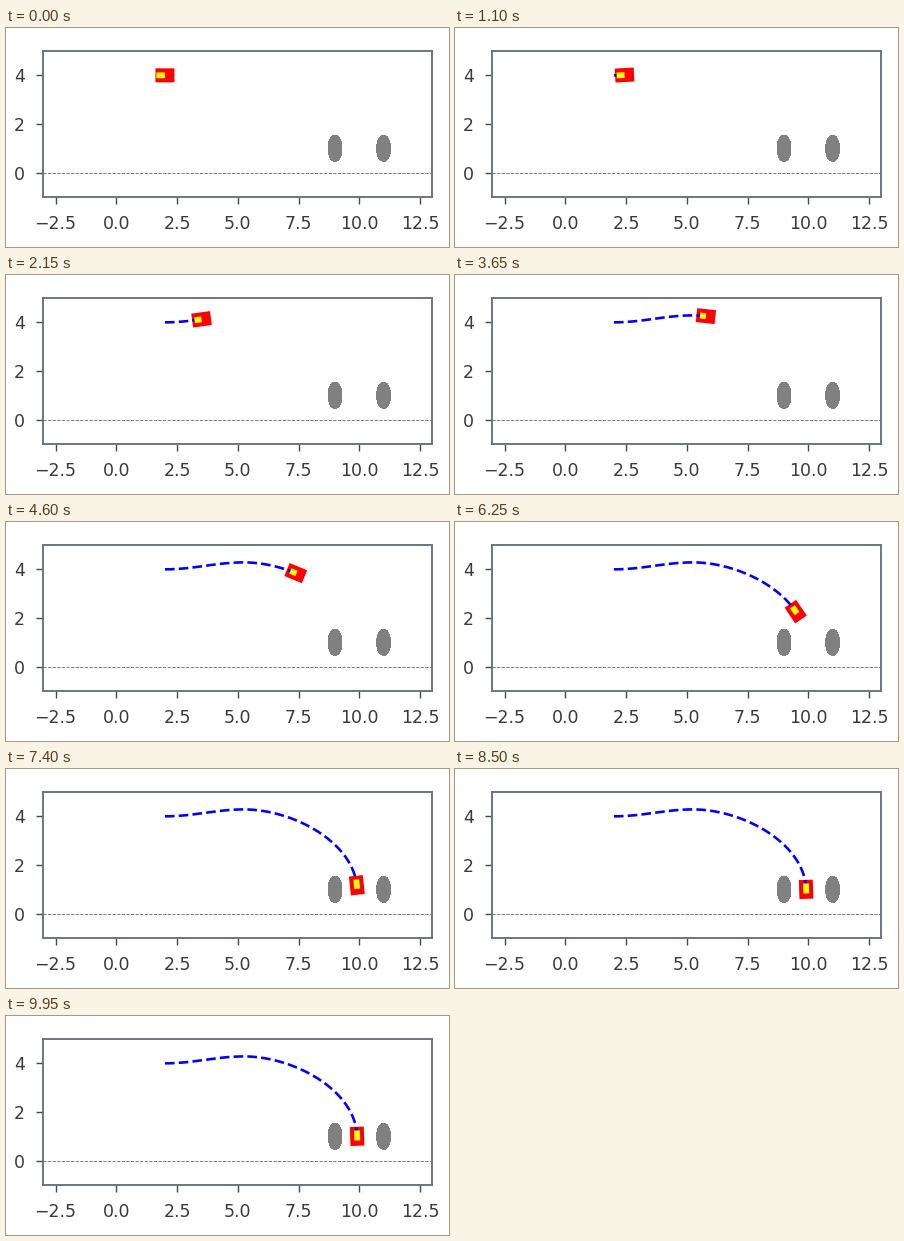
Animation, 443 px wide and 219 px high, one loop 10000 ms. Source, as a matplotlib script:

```python
import numpy as np
import matplotlib.pyplot as plt
from matplotlib.animation import FuncAnimation
from matplotlib.patches import Ellipse, Polygon

W, H, DPI = 443, 219, 125
FRAMES, STEP = 200, 50
LENGTH, WIDTH, BAR = 0.78, 0.575, 0.24
BASE = -0.12

# control points: a gentle climb, then a turn down into the gap
CLIMB = [(2, 4), (3.2, 4), (4.1, 4.285), (5.25, 4.285)]
DIVE = [(5.25, 4.285), (7.3, 4.285), (9.85, 2.9), (9.91, 1)]


def bezier(points, n=800):
    a, b, c, d = np.array(points)
    s = np.linspace(0, 1, n)[:, None]
    return ((1 - s) ** 3 * a + 3 * s * (1 - s) ** 2 * b
            + 3 * s * s * (1 - s) * c + s ** 3 * d)


path = np.vstack([bezier(CLIMB)[:-1], bezier(DIVE)])
leg = np.diff(path, axis=0)
dist = np.append(0, np.cumsum(np.hypot(*leg.T)))
course = np.arctan2(leg[:, 1], leg[:, 0])

# half-sine speed, braked hard near the end
t = np.arange(FRAMES) * STEP / 1000
speed = np.sin(np.pi * np.minimum(t / 8.7, 1)).clip(0) ** 0.9
speed /= 1 + np.exp((t - 7.52) / 0.27)
gone = np.append(0, np.cumsum((speed[1:] + speed[:-1]) / 2))
gone *= dist[-1] / gone[-1]

xs = np.interp(gone, dist, path[:, 0])
ys = np.interp(gone, dist, path[:, 1])
angles = np.interp(gone, dist[1:], course)
tips = -0.23 + 0.28 * np.minimum(t / 8, 1) ** 1.2


def box(n, rear, front, width):
    """Corners of a body-aligned rectangle at frame n."""
    c, s = np.cos(angles[n]), np.sin(angles[n])
    w = width / 2
    pts = np.array([(rear, -w), (front, -w), (front, w), (rear, w)])
    return pts @ np.array([(c, s), (-s, c)]) + (xs[n], ys[n])


fig = plt.figure(figsize=(W / DPI, H / DPI), dpi=DPI, facecolor="white")
ax = fig.add_axes([37.45 / W, 50 / H, 388.75 / W, 146 / H])
ax.set(xlim=(-3, 13), ylim=(-1, 5))
ax.set_xticks(np.arange(-2.5, 13, 2.5))
ax.set_yticks([0, 2, 4])
ax.tick_params(length=4, width=0.8, pad=6.5, labelsize=10,
               color="#454a52", labelcolor="#3a3a3e")
for spine in ax.spines.values():
    spine.set(color="#69727e", linewidth=1.1)

ax.axhline(0, color="#666a6e", ls="--", lw=0.5)
for cx in (9, 11):
    ax.add_patch(Ellipse((cx, 1), 0.5, 1, color="gray", antialiased=False))

body = ax.add_patch(Polygon(box(0, -LENGTH / 2, LENGTH / 2, WIDTH),
                            facecolor="red", edgecolor="none", zorder=2))
trail, = ax.plot([], [], "b--", lw=1.5, zorder=3)
bar = ax.add_patch(Polygon(box(0, BASE, 0, BAR),
                           facecolor="yellow", edgecolor="none", zorder=4))


def draw(n):
    body.set_xy(box(n, -LENGTH / 2, LENGTH / 2, WIDTH))
    rear, front = sorted((BASE, tips[n]))
    bar.set_xy(box(n, rear - BAR / 2, front + BAR / 2, BAR))
    trail.set_data(xs[:n + 1], ys[:n + 1])
    return body, trail, bar


anim = FuncAnimation(fig, draw, frames=FRAMES, interval=STEP,
                     init_func=lambda: draw(0), repeat=True, repeat_delay=0)
plt.show()
```
